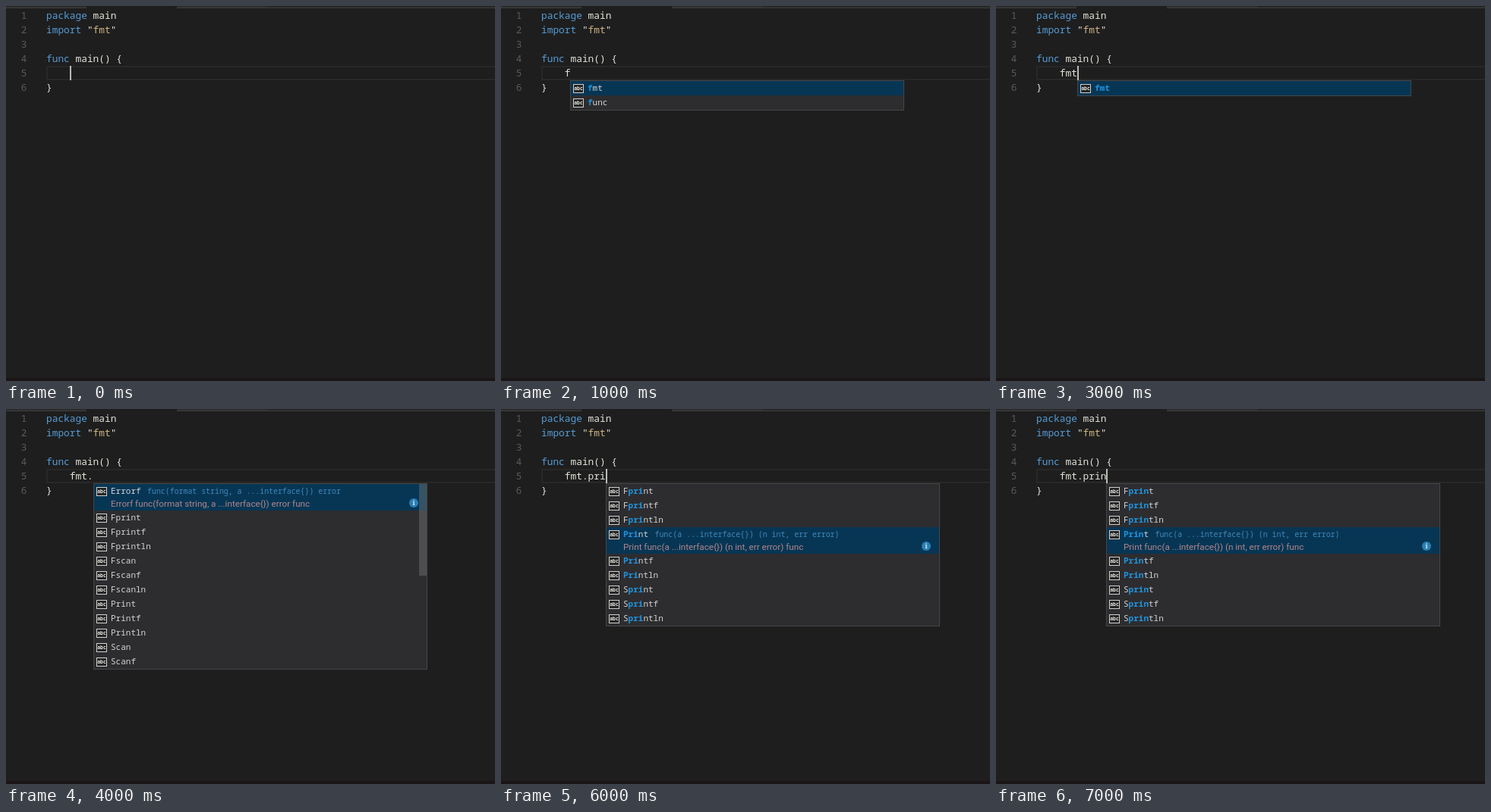
An HTML page for the animation above (8000 ms loop, 644 by 495 pixels).

```html
<!DOCTYPE html>
<html>
<head>
<meta charset="utf-8">
<style>
  html, body { margin: 0; height: 100%; overflow: hidden; background: #1e1e1e; }
  svg { display: block; }
  text { white-space: pre; font: 12.83px "Noto Sans Mono", monospace; fill: #e4e4dc; }
  .num { fill: #5a5a5a; text-anchor: end; }
  .key { fill: #569cd6; }
  .str { fill: #d0b584; }
  .label { font-size: 11px; fill: #d4d4d4; }
  .hit { font-weight: 700; fill: #1f95df; }
  .sig { font-size: 9.9px; fill: #4088bb; }
  .doc { font: 11.7px Roboto, sans-serif; fill: #b28689; }
  .abc { font-size: 6.5px; font-weight: 700; text-anchor: middle; }
  .info { font: 700 9px "Noto Serif", serif; text-anchor: middle; fill: #d8e8f2; }
</style>
</head>
<body>
<svg id="stage" width="644" height="495"></svg>
<script>
const STEP = 1000, CHAR = 7.697, ROW = 19, LEFT = 53;
const caretX = n => Math.round(83.79 + n * CHAR);

const rect = (x, y, w, h, fill, more = '') =>
  `<rect x="${x}" y="${y}" width="${w}" height="${h}" fill="${fill}" ${more}/>`;
const text = (x, y, content, cls = '') => `<text x="${x}" y="${y}" class="${cls}">${content}</text>`;
const span = (cls, content) => `<tspan class="${cls}">${content}</tspan>`;

const scanned = 'Errorf Fprint Fprintf Fprintln Fscan Fscanf Fscanln Print Printf Println Scan Scanf'.split(' ');
const printers = 'Fprint Fprintf Fprintln Print Printf Println Sprint Sprintf Sprintln'.split(' ');
const printSig = 'func(a ...interface{}) (n int, err error)';

const printList = typed => ({ typed, caret: typed !== 'fmt.pr', items: printers, selected: 3, sig: printSig });
const steps = [
  { typed: '', caret: true },
  { typed: 'f', items: ['fmt', 'func'] },
  { typed: 'fm', caret: true, items: ['fmt'] },
  { typed: 'fmt', caret: true, items: ['fmt'] },
  { typed: 'fmt.', items: scanned, sig: 'func(format string, a ...interface{}) error', scrollbar: true },
  printList('fmt.pr'), printList('fmt.pri'), printList('fmt.prin')
];

function highlight(word, query) {
  const at = word.toLowerCase().indexOf(query);
  if (!query || at < 0) return word;
  const end = at + query.length;
  return word.slice(0, at) + span('hit', word.slice(at, end)) + word.slice(end);
}

function popup({ typed, items, selected = 0, sig, scrollbar }) {
  const x = caretX(typed.length), query = typed.split('.').pop();
  const height = items.length * ROW + (sig ? 16 : 0) + 2;
  let out = rect(x + .5, 98.5, 439, height - 1, '#2d2d30', 'stroke="#454545"');
  let y = 99;
  items.forEach((word, i) => {
    const open = i === selected && sig;
    const rowHeight = open ? ROW + 16 : ROW;
    if (i === selected) out += rect(x + 1, y, 438, rowHeight, '#073655');
    out += rect(x + 4.5, y + 4.5, 13, 11, '#252526', 'stroke="#d0d0d0"');
    out += text(x + 11, y + 12.3, 'abc', 'abc');
    out += text(x + 23, y + 13, highlight(word, query), 'label');
    if (open) {
      out += text(x + 31.5 + word.length * 6.6, y + 13, sig, 'sig');
      out += text(x + 23, y + 30, `${word} ${sig} func`, 'doc');
      out += `<circle cx="${x + 422}" cy="${y + 25}" r="6" fill="#2980b5"/>`;
      out += text(x + 422, y + 28.3, 'i', 'info');
    }
    y += rowHeight;
  });
  if (scrollbar) out += rect(x + 429, 99, 10, 121, '#797979', 'fill-opacity=".42"');
  return out;
}

function scene(step) {
  const code = [
    span('key', 'package') + ' main',
    span('key', 'import') + ' "' + span('str', 'fmt') + '"',
    '',
    span('key', 'func') + ' main() {',
    '    ' + step.typed,
    '}'
  ];
  let out = rect(0, 0, 106, 2, '#2b2b2b') + rect(0, 2, 106, 1, '#404040')
    + rect(225, 0, 120, 2, '#2d2d2d') + rect(345, 0, 299, 2, '#252526') + rect(225, 2, 419, 1, '#404040')
    + rect(0, 491, 644, 4, '#1b1518')
    + rect(54, 80, 600, 17, 'none', 'stroke="#282828" stroke-width="2"');
  code.forEach((line, i) => {
    const y = 17 + i * ROW;
    out += text(27.5, y, i + 1, 'num') + text(LEFT, y, line);
  });
  if (step.caret) out += rect(caretX(step.typed.length), 79, 2, ROW, '#b4bdb4');
  return out + (step.items ? popup(step) : '');
}

const stage = document.getElementById('stage');
let shown = -1;
function draw() {
  const now = Math.floor(performance.now() / STEP) % steps.length;
  if (now !== shown) stage.innerHTML = scene(steps[shown = now]);
  requestAnimationFrame(draw);
}
draw();
</script>
</body>
</html>
```
